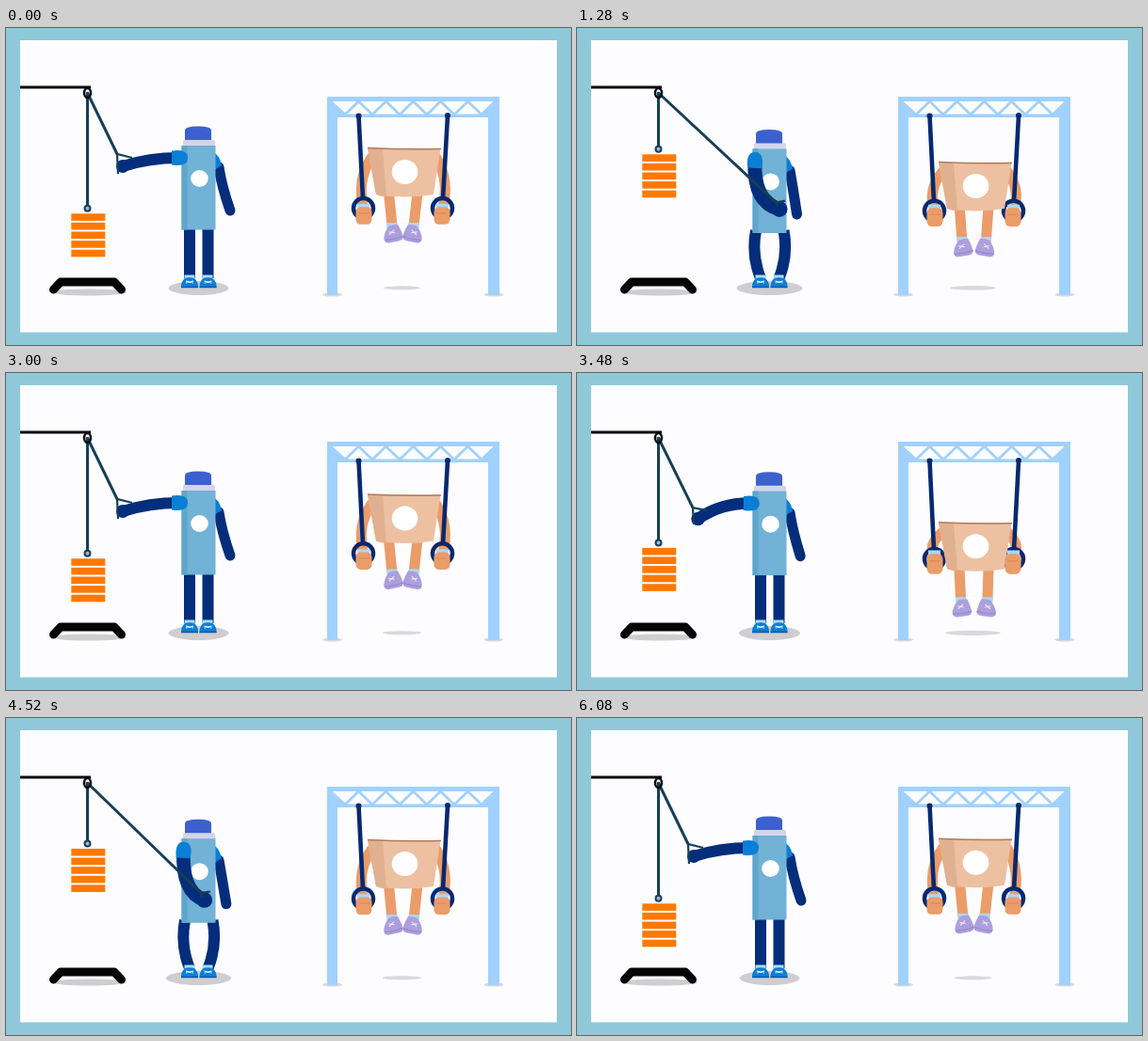
Write an HTML page that moves like this. It is 600 px wide and 337 px high and loops after 6.12 s.

```html
<!DOCTYPE html>
<html lang="en">
<head>
<meta charset="utf-8">
<title>Workout</title>
<style>
  html, body { margin: 0; width: 100%; height: 100%; overflow: hidden; background: #8fc9d9; }
  svg { display: block; width: 100%; height: 100%; }
  .rope { fill: none; stroke: #163f58; stroke-width: 3; }
  .limb { fill: none; stroke-linecap: round; }
  .navy { stroke: #042d7b; }
  .skin { stroke: #ea9c69; }
</style>
</head>
<body>
<svg viewBox="0 0 600 337" preserveAspectRatio="none">
  <defs>
    <g id="sneaker">
      <path d="M-5 -7Q0 -8.500 5 -7Q9 -3 9 1V3H-9V1Q-9 -3 -5 -7Z" fill="#0b7ed5"/>
      <path d="M-9 2.500H9" stroke="#0757a8" stroke-width="1.5"/>
      <path d="M-4 -4L4 -2M4 -4L-4 -2" stroke="#fff" stroke-width="1.2"/>
    </g>
    <g id="trainer">
      <path d="M-3 -9Q2 -10 7 -9Q10 0 10 5Q9 8.500 5 8.500H-6Q-11 8 -10.500 3Q-9 -3 -3 -9Z" fill="#ac9fdc"/>
      <path d="M-10 4.500Q0 6.500 10 4.500" fill="none" stroke="#9688cd" stroke-width="1.2"/>
      <path d="M-4 -3L2 -1M2 -4L-4 0" stroke="#e9e4fb" stroke-width="1.1"/>
    </g>
    <rect id="bar" width="36" height="7.600" fill="#ff7900"/>
  </defs>
  <rect width="600" height="337" fill="#8fc9d9"/>
  <rect x="15" y="13" width="570" height="310.500" fill="#fdfdff"/>

  <ellipse cx="88" cy="281" rx="40" ry="3.500" fill="#cfcdcf"/>
  <path d="M50.500 278L58 270H115L122.500 278" fill="none" stroke="#050505" stroke-width="9" stroke-linecap="round" stroke-linejoin="round"/>
  <path d="M15 63H90" stroke="#0a0a0a" stroke-width="3"/>
  <path id="lift" class="rope"/>
  <g id="weights">
    <circle cx="86.500" cy="-5.500" r="3" fill="#9db8c6" stroke="#173f63" stroke-width="2"/>
    <use href="#bar" x="69.300"/><use href="#bar" x="69.300" y="9.600"/><use href="#bar" x="69.300" y="19.200"/>
    <use href="#bar" x="69.300" y="28.800"/><use href="#bar" x="69.300" y="38.400"/>
  </g>

  <ellipse id="tubeShadow" cx="204.500" cy="276.500" ry="7.500" fill="#cfcdcf"/>
  <path id="tubeLegs" class="limb navy" stroke-width="12" style="stroke-linecap:butt"/>
  <path d="M189.500 265H200.500M208.500 265H219.500" stroke="#a9dcf7" stroke-width="5"/>
  <use href="#sneaker" x="195" y="273"/><use href="#sneaker" x="214.500" y="273"/>
  <path id="backArm" class="limb navy" stroke-width="11"/>
  <g id="tube">
    <path d="M219 131Q227 135 229 146L221 151Z" fill="#0b7ed5"/>
    <path d="M190 120V109Q190 104.500 204 104.500Q218 104.500 218 109V120Z" fill="#3c61cf"/>
    <rect x="188" y="119" width="34" height="6.500" rx="1.500" fill="#d4d5ea"/>
    <rect x="186.500" y="125" width="36" height="89.500" fill="#71b2d6"/>
    <rect x="186.500" y="125" width="6" height="89.500" fill="#60a5ca"/>
    <ellipse cx="205.500" cy="160" rx="9.300" ry="9" fill="#fff"/>
  </g>
  <path id="frontArm" class="limb navy"/>
  <path id="sleeve" d="M8 -7.500Q-9 -10 -9 0Q-9 10 8 7.500Z" fill="#0b7ed5"/>
  <circle id="fist" fill="#042d7b"/>
  <path id="pull" class="rope"/>
  <path id="handle" class="rope" style="stroke-width:2.2"/>
  <ellipse cx="86.500" cy="69" rx="3.500" ry="5" fill="none" stroke="#0a0a0a" stroke-width="2.500"/>
  <circle cx="86.500" cy="69.500" r="1.800" fill="#173f63"/>

  <g fill="#dad8dd">
    <ellipse cx="346.500" cy="283.500" rx="10.500" ry="2"/>
    <ellipse cx="518" cy="283.500" rx="10.500" ry="2"/>
    <ellipse id="cupShadow" cx="420.500" cy="276.300"/>
  </g>
  <path d="M341 73H524V284H512V95H352V284H341Z" fill="#a1d1ff"/>
  <path d="M346 78H519L505 91.500H360Z" fill="#fdfdff"/>
  <path id="zigzag" fill="none" stroke="#a1d1ff" stroke-width="2.800"/>
  <path id="cupArms" class="limb skin" stroke-width="11"/>
  <path id="cupLegs" class="limb skin" stroke-width="11" style="stroke-linecap:butt"/>
  <path id="socks" stroke="#a9d8fb" stroke-width="11"/>
  <use id="leftShoe" href="#trainer"/><use id="rightShoe" href="#trainer"/>
  <path id="straps" stroke="#08296f" stroke-width="4.600"/>
  <g fill="#08296f"><circle cx="374.500" cy="93.500" r="3"/><circle cx="469" cy="93" r="3"/></g>
  <g id="rings" fill="none" stroke="#08296f" stroke-width="4.500">
    <circle cx="379.500" r="10.500"/><circle cx="463.500" r="10.500"/>
  </g>
  <g id="cup">
    <path d="M384 128H461.500L454 177Q424 182 393 177Z" fill="#edc0a1"/>
    <path d="M384 128H400L404 179.500Q398 179 393 177Z" fill="#e1b090"/>
    <path d="M384 127.500Q422 129.500 462 128.500" fill="none" stroke="#b17a59" stroke-width="1.500"/>
    <ellipse cx="423.500" cy="153" rx="13.800" ry="13" fill="#fff"/>
  </g>
  <g id="hands" fill="#ea9c69">
    <path d="M373 -9H386M457 -9H470" stroke="#a9d8fb" stroke-width="4"/>
    <rect x="371.500" y="-8" width="17" height="17" rx="5"/>
    <rect x="454.500" y="-8" width="17" height="17" rx="5"/>
    <path d="M375 -2H386M457 -2H468" stroke="#d98a58"/>
  </g>
</svg>
<script>
const $ = id => document.getElementById(id);
const set = (id, attrs) => { for (const k in attrs) $(id).setAttribute(k, attrs[k]); };
const line = (id, d) => set(id, { d });
const shift = (id, y) => set(id, { transform: `translate(0 ${y})` });
const clamp = x => Math.min(1, Math.max(0, x));
const ease = x => (1 - Math.cos(Math.PI * clamp(x))) / 2;
const mix = (a, b, u) => a + (b - a) * u;

// progress, hand x, hand y, elbow control x, elbow control y
const reach = [
  [0, 124, 147, 152, 138], [.2, 129, 156, 153, 138], [.33, 135, 168, 157, 142],
  [.57, 168, 190, 165, 168], [.79, 203, 195, 185, 185], [1, 215.5, 192.5, 187, 185]
];
// time, drop of the cup
const dips = [[0, 0], [530, 41], [690, 53], [860, 37], [1280, 15], [1530, 0]];

function armAt(p) {
  const i = Math.max(1, reach.findIndex(r => r[0] >= p));
  const [a, b] = [reach[i - 1], reach[i]];
  const u = (p - a[0]) / (b[0] - a[0]);
  return a.map((v, k) => mix(v, b[k], u)).slice(1);
}

function dropAt(t) {
  const slope = i => {
    if (i % 5 === 0 || i === 2) return 0;
    const [a, b] = [dips[i - 1], dips[i + 1]];
    return (b[1] - a[1]) / (b[0] - a[0]);
  };
  const i = dips.findIndex(d => d[0] > t) - 1;
  const [[t0, y0], [t1, y1]] = [dips[i], dips[i + 1]];
  const w = t1 - t0, u = (t - t0) / w, v = 1 - u;
  return y0 * v * v * (1 + 2 * u) + y1 * u * u * (3 - 2 * u)
    + w * (slope(i) * u * v * v - slope(i + 1) * u * u * v);
}

function drawTube(t) {
  const p = t < 1200 ? ease((t - 120) / 1080) : 1 - ease((t - 1200) / 1420);
  const top = 197.3 - 63.5 * p, sink = 3.5 * p;
  const bend = clamp((p - .3) / .4);
  const [hx, hy, ex, ey] = armAt(p);
  const sx = mix(184, 189, p), sy = mix(138, 141, p);

  shift('weights', top);
  line('lift', `M86.5 69V${top - 8}`);
  shift('tube', sink);
  set('tubeShadow', { rx: 32 + 3 * p });
  const leg = (x, side) =>
    `M${x + side * 5 * bend} ${212 + sink}Q${x + side * 10 * bend} 242 ${x} 266`;
  line('tubeLegs', leg(195, -1) + leg(214.5, 1));
  line('backArm', `M226 ${148 + sink}Q229 168 ${238 - 4.5 * p} ${194 + 4 * p}`);
  set('frontArm', { d: `M${sx} ${sy}Q${ex} ${ey} ${hx} ${hy}`, 'stroke-width': 12 + 3 * p });
  const angle = Math.atan2(ey - sy, ex - sx) * 180 / Math.PI;
  set('sleeve', { transform: `translate(${sx} ${sy}) rotate(${angle})` });
  set('fist', { cx: hx, cy: hy, r: 7 + 1.5 * p });

  const ax = hx - 6 + 2.5 * p, ay = hy - 13 + 6 * p;
  line('pull', `M86.5 69L${ax} ${ay}`);
  line('handle', `M${hx + 10 - 4 * p} ${hy - 9}L${ax} ${ay}L${hx - 5 + 3 * p} ${hy + 8 - 12 * p}`);
}

function drawCup(t) {
  const d = dropAt(t), q = d / 52;
  const fx = [411 - 4 * q, 432 + 5 * q], fy = 219 + d;
  const ringY = 191.5 + 10 * q, handY = 199 + 5.5 * q;
  const spin = 12 * Math.sqrt(clamp(1 - q));

  shift('cup', d);
  shift('rings', ringY);
  set('hands', { transform: `translate(0 ${handY}) scale(1 ${1.08 + .3 * q})` });
  set('cupShadow', { rx: 20 + 15.5 * q, ry: 2 + q });
  line('straps', `M374.5 93L379 ${ringY - 10}M469 93L464 ${ringY - 10}`);
  const elbowY = mix(162, 196, q);
  line('cupArms', `M388 ${138 + d}Q372 ${elbowY} 380 ${handY - 6}M457 ${138 + d}Q471.5 ${elbowY} 463.5 ${handY - 6}`);
  line('cupLegs', `M${406.500 - q} ${175 + d}L${fx[0] - 1} ${fy - 9}M437 ${175 + d}L${fx[1] + 1} ${fy - 9}`);
  line('socks', `M${fx[0] - 1} ${fy - 12}v6M${fx[1] + 1} ${fy - 12}v6`);
  set('leftShoe', { transform: `translate(${fx[0]} ${fy}) rotate(${-spin})` });
  set('rightShoe', { transform: `translate(${fx[1]} ${fy}) scale(-1 1) rotate(${-spin})` });
}

let zig = 'M344.5 78';
for (let i = 0; i < 12; i++) zig += `L${360 + i * 14.5} ${i % 2 ? 78 : 92}`;
line('zigzag', zig);

function draw(now) {
  const t = now % 6120;
  drawTube(t % 3060);
  drawCup(t % 1530);
}

const start = performance.now();
function tick() {
  draw(performance.now() - start);
  requestAnimationFrame(tick);
}
tick();
</script>
</body>
</html>
```
